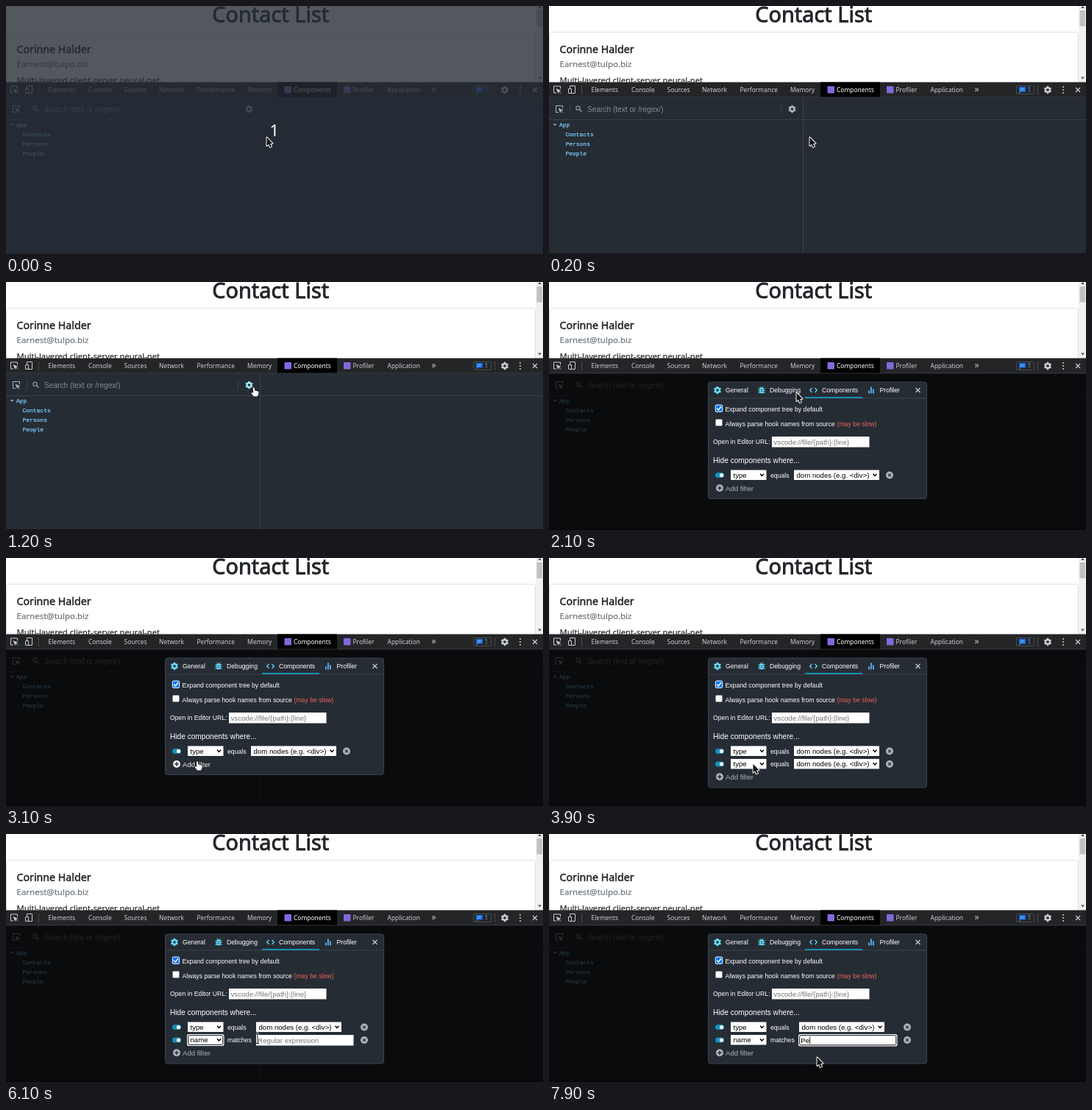
Animation, 730 px wide and 337 px high, one loop 8000 ms. Source, as an HTML page with a canvas:

```html
<!DOCTYPE html>
<html lang="en">
<head>
<meta charset="utf-8">
<title>Component filter demo</title>
<style>
html, body { margin: 0; width: 730px; height: 337px; overflow: hidden; background: #262c34; }
canvas { display: block; width: 730px; height: 337px; }
</style>
</head>
<body>
<canvas id="stage"></canvas>
<script>
const W = 730, H = 337, LOOP = 8000;
const canvas = document.getElementById('stage');
const c = canvas.getContext('2d');
const dpr = window.devicePixelRatio || 1;
canvas.width = W * dpr;
canvas.height = H * dpr;

const UI = '"Noto Sans", "Open Sans", sans-serif';
const ARIAL = '"Liberation Sans", Arial, sans-serif';
const MONO = '"Liberation Mono", "Courier New", monospace';
const PANEL = '#262c34', LINE = '#3d424a', GREY = '#afb3b9', CYAN = '#61dafb';
const SMALL = 8.69, FORM = 9.65, LARGE = 10.14;
const TOP = 103.5;

// time, x, y, pointer shape
const path = [
  [0, 354, 178, 'arrow'], [200, 354, 178, 'arrow'], [400, 345, 159.7, 'arrow'],
  [500, 338.5, 147.5, 'hand'], [600, 338.5, 147.5, 'hand'], [800, 335.8, 143, 'hand'],
  [1300, 335.8, 143, 'arrow'], [2000, 335.8, 143, 'arrow'], [2100, 336, 150, 'arrow'],
  [2900, 262, 275, 'hand'], [3000, 262, 275, 'hand'], [3100, 259, 276, 'hand'],
  [3500, 259, 276, 'arrow'], [3900, 277, 279.5, 'arrow'], [4600, 277, 279.5, 'arrow'],
  [5000, 273, 304, 'arrow'], [5800, 273, 304, 'arrow'], [6100, 342, 278, 'beam'],
  [6400, 349, 278, 'beam'], [6500, 349, 278, 'beam'], [6600, 354, 283, 'beam'],
  [6800, 354, 283, 'beam'], [6900, 364, 303, 'arrow'], [8000, 364, 303, 'arrow']
];

function rect(x, y, w, h, color) {
  c.fillStyle = color;
  c.fillRect(x, y, w, h);
}

function box(x, y, w, h, r, fill, edge) {
  c.beginPath();
  c.roundRect(x, y, w, h, r);
  if (fill) { c.fillStyle = fill; c.fill(); }
  if (edge) { c.strokeStyle = edge; c.lineWidth = 1; c.stroke(); }
}

function text(s, x, y, size, color, family = ARIAL, weight = 400) {
  c.font = `${weight} ${size}px ${family}`;
  c.fillStyle = color;
  c.fillText(s, x, y);
}

// Thickens the stems by a thin outline, for weights between regular and bold.
function heavyText(s, x, y, size, color, family, heft) {
  text(s, x, y, size, color, family);
  c.strokeStyle = color;
  c.lineWidth = heft;
  c.lineJoin = 'round';
  c.strokeText(s, x, y);
}

function stroke(points, color, width = 1, close = false) {
  c.beginPath();
  points.forEach(([x, y]) => c.lineTo(x, y));
  if (close) c.closePath();
  c.strokeStyle = color;
  c.lineWidth = width;
  c.stroke();
}

function shape(points, color) {
  c.beginPath();
  points.forEach(([x, y]) => c.lineTo(x, y));
  c.fillStyle = color;
  c.fill();
}

function disc(x, y, r, color) {
  c.beginPath();
  c.arc(x, y, r, 0, 7);
  c.fillStyle = color;
  c.fill();
}

function cross(x, y, r, color, width = 1) {
  stroke([[x - r, y - r], [x + r, y + r]], color, width);
  stroke([[x + r, y - r], [x - r, y + r]], color, width);
}

function gear(x, y, r, color) {
  c.beginPath();
  c.arc(x, y, r * 0.57, 0, 7);
  c.strokeStyle = color;
  c.lineWidth = r * 0.45;
  c.stroke();
  for (let i = 0; i < 6; i++) {
    const a = i * Math.PI / 3 + Math.PI / 6, dx = Math.cos(a) * r, dy = Math.sin(a) * r;
    stroke([[x + dx * 0.65, y + dy * 0.65], [x + dx, y + dy]], color, r * 0.42);
  }
}

function picker(x, y, color) {
  stroke([[x + 4.5, y - 1], [x + 4.5, y - 4.5], [x - 4.5, y - 4.5], [x - 4.5, y + 4.5], [x - 1, y + 4.5]], color);
  shape([[x - 1.5, y - 1.5], [x + 5.5, y + 1.5], [x + 2.5, y + 2.5], [x + 1.5, y + 5.5]], color);
  stroke([[x + 2, y + 2], [x + 5, y + 5]], color);
}

function page(hover) {
  c.save();
  c.beginPath();
  c.rect(0, 0, W, 104);
  c.clip();
  rect(0, 0, W, 104, '#fff');
  c.textAlign = 'center';
  heavyText('Contact List', 359.7, 22.3, 28.9, '#212529', UI, 0.9);
  c.textAlign = 'left';
  box(0.5, 35.7, 719, 120, 3, null, '#dfdfdf');
  heavyText('Corinne Halder', 14.5, 64, 14.2, '#212529', UI, 0.5);
  heavyText('Earnest@tulpo.biz', 14.5, 83, 11.5, '#6c757d', UI, 0.2);
  heavyText('Multi-layered client-server neural-net', 14.5, 105, 11.2, '#212529', UI, 0.15);
  if (hover) {
    rect(0, 0, 720, 104, 'rgba(120,170,210,.7)');
    box(2, -4, 109, 20, 2, '#546f89');
    text('App', 6.5, 9.3, SMALL, '#98a2cb', MONO, 700);
    rect(30, 1, 1, 11, '#7f93a6');
    text('994px × 1646px', 35, 9.3, SMALL, '#b4c9da', MONO, 700);
  }
  rect(720, 0, 10, 104, '#f1f1f1');
  rect(721.5, 6, 7.5, 21.5, '#c1c1c1');
  shape([[723, 3], [728, 3], [725.5, 0]], '#505050');
  shape([[723, 96.5], [728, 96.5], [725.5, 99.5]], '#505050');
  c.restore();
}

function toolbar() {
  const ink = '#cbced2';
  rect(0, TOP, W, 22, '#242527');
  rect(0, TOP + 20, W, 1, '#3f4245');
  rect(369, TOP, 81, 20, '#000');
  picker(11, 113.5, ink);
  box(28.5, 108.5, 7, 10, 0.5, null, ink);
  box(26.5, 112.5, 4, 6, 0.5, '#242527', ink);
  rect(44, 108, 1, 12, '#494c50');
  const tabs = [['Elements', 57.5], ['Console', 112], ['Sources', 160.5], ['Network', 208],
    ['Performance', 259.5], ['Memory', 328], ['Components', 391], ['Profiler', 471.5], ['Application', 518.5]];
  tabs.forEach(([s, x]) => text(s, x, 116.8, 8.45, s === 'Components' ? '#fff' : ink, UI));
  box(378.5, 109, 9.5, 9.5, 1, '#8468dc');
  box(459, 109, 9.5, 9.5, 1, '#8468dc');
  text('»', 578.5, 117, 12, ink, UI);
  box(635.5, 108.5, 24, 11, 1, null, '#494c50');
  box(639, 110, 9, 6.5, 1, '#1a73e8');
  shape([[639, 115], [639, 119], [642.5, 116]], '#1a73e8');
  rect(641, 112, 5, 0.8, '#8fbcf5');
  rect(641, 114, 4, 0.8, '#8fbcf5');
  text('1', 650.5, 117, 8.4, '#6ba5ef', UI);
  rect(664, 108, 1, 12, '#494c50');
  gear(678, 114, 5.3, ink);
  [110, 114, 118].forEach(y => disc(699, y, 1, ink));
  cross(719, 114, 3, ink, 1.2);
}

function tree(hover, gearColor) {
  rect(0, TOP + 21, W, H, PANEL);
  picker(14, 140, GREY);
  rect(28, 134, 1, 12, LINE);
  c.beginPath();
  c.arc(39.5, 138.7, 2.6, 0, 7);
  c.strokeStyle = '#8f959d';
  c.lineWidth = 1.2;
  c.stroke();
  stroke([[41.4, 140.6], [44.5, 143.7]], '#8f959d', 1.4);
  text('Search (text or /regex/)', 52, 143.5, LARGE, '#858b93');
  rect(315, 134, 1, 12, LINE);
  gear(330.5, 140, 5.2, gearColor);
  rect(0, 154, W, 1, LINE);
  if (hover) rect(0, 154.5, 345, 13.5, LINE);
  rect(345, 125, 1, H - 125, LINE);
  shape([[5.5, 160], [10.5, 160], [8, 163]], '#9aa0a8');
  heavyText('App', 14, 164, 7.96, '#7ccbfa', MONO, 0.25);
  ['Contacts', 'Persons', 'People']
    .forEach((s, i) => heavyText(s, 22.5, 177 + i * 13, 7.96, '#7ccbfa', MONO, 0.25));
  rect(0, 336, W, 1, '#101316');
}

function focusRing(x, y, w, h) {
  box(x - 1, y - 1, w + 2, h + 2, 2.5, '#fff');
  box(x + 0.7, y + 0.7, w - 1.4, h - 1.4, 1.5, '#fff', '#101010');
}

function select(s, x, y, w, focus) {
  if (focus) focusRing(x, y, w, 14);
  else rect(x, y, w, 13.5, '#fff');
  text(s, x + 3.5, y + 10, FORM, '#000');
  const a = x + w - 6;
  stroke([[a - 2.5, y + 5.3], [a, y + 8], [a + 2.5, y + 5.3]], '#000', 1.4);
}

function removeIcon(x, y) {
  disc(x, y, 5, GREY);
  cross(x, y, 1.9, PANEL, 1.2);
}

function toggle(y) {
  box(226, y - 3.5, 12, 7, 3.5, '#178fb9');
  disc(234.6, y, 2.6, '#fff');
}

function filterRow(y, kind, verb, focus) {
  toggle(y);
  select(kind, 247, y - 7, 48.5, focus);
  text(verb, 301, y + 3, SMALL, '#fff');
}

function bug(x, y) {
  box(x - 2.7, y - 3.5, 5.4, 8, 2.7, CYAN);
  [-2, 0.7, 3.3].forEach(d => stroke([[x - 4.6, y + d], [x + 4.6, y + d]], CYAN, 1.1));
  stroke([[x - 2.5, y - 5], [x, y - 3], [x + 2.5, y - 5]], CYAN);
  rect(x - 1.2, y - 1, 2.4, 0.9, PANEL);
  rect(x - 1.2, y + 1.4, 2.4, 0.9, PANEL);
}

function dialog(t) {
  const two = t >= 3500, named = t >= 5700, typing = t >= 6400;
  rect(0, TOP + 21, W, H, 'rgba(0,0,0,.75)');
  box(216.5, 136, 297, two ? 176 : 158.5, 3, PANEL, LINE);
  rect(217, 157.5, 296, 1, LINE);
  rect(348, 156, 78, 2, '#178fb9');
  gear(229, 147, 5.2, CYAN);
  bug(289, 147);
  stroke([[357.5, 144], [354.7, 147], [357.5, 150]], CYAN, 1.2);
  stroke([[361.5, 144], [364.3, 147], [361.5, 150]], CYAN, 1.2);
  [[434, 4], [437, 9], [440, 6]].forEach(([x, h]) => rect(x, 151.5 - h, 1.8, h, '#5bb4f5'));
  [['General', 240], ['Debugging', 300], ['Components', 371], ['Profiler', 449.5]]
    .forEach(([s, x]) => text(s, x, 150.2, SMALL, '#fff'));
  cross(501.5, 147, 3, '#d0d3d7', 1.1);

  box(226.3, 167, 9.4, 9.4, 1.5, '#0075ff', '#fff');
  stroke([[228.2, 171.8], [230.3, 174], [234, 169.2]], '#fff', 1.5);
  text('Expand component tree by default', 239.5, 176, SMALL, '#fff');
  box(226.5, 186.5, 9, 9, 1.5, '#fff', '#8a8a8a');
  text('Always parse hook names from source', 239.5, 195.5, SMALL, '#fff');
  text('(may be slow)', 391.5, 195.5, SMALL, '#f0625a');
  text('Open in Editor URL:', 223, 220.3, SMALL, '#fff');
  rect(303, 210, 132.5, 14.5, '#fff');
  text('vscode://file/{path}:{line}', 305.5, 220.5, FORM, '#757575');
  text('Hide components where...', 223, 245.5, LARGE, '#fff');

  filterRow(262.5, 'type', 'equals', false);
  select('dom nodes (e.g. <div>)', named ? 340 : 333, 255.5, 116, false);
  removeIcon(named ? 487 : 463, 262.5);

  if (two) {
    const focus = t >= 4200 && !typing;
    filterRow(280, named ? 'name' : 'type', named ? 'matches' : 'equals', focus);
    removeIcon(named ? 487 : 463, 280);
    if (!named) select('dom nodes (e.g. <div>)', 333, 273, 116, false);
    else {
      if (typing) focusRing(340, 273, 132.5, 14.5);
      else rect(340, 273, 132.5, 14.5, '#fff');
      if (t >= 7900) {
        text('Pe', 342.3, 283.5, FORM, '#000');
        rect(354.3, 275.5, 0.8, 10, '#000');
      } else {
        text('Regular expression', 342.3, 283.5, FORM, '#757575');
        if (typing && t < 6900) rect(342, 275.5, 0.8, 10, '#000');
      }
    }
  }

  const y = two ? 297.3 : 280;
  const ink = t >= 2900 && !two ? '#ededed' : GREY;
  disc(232, y, 5, ink);
  rect(229.2, y - 0.7, 5.6, 1.4, PANEL);
  rect(231.3, y - 2.8, 1.4, 5.6, PANEL);
  text('Add filter', 240, y + 3.5, FORM, ink);
}

function menu(pointerY) {
  const active = pointerY > 300 ? 1 : 2;
  rect(245, 287, 52, 52, '#fff');
  ['location', 'name', 'type', 'hoc'].forEach((s, i) => {
    const y = 287 + i * 13;
    if (i === active) rect(245, y, 52, 13, '#1e6fd9');
    text(s, 250.5, y + 9.7, FORM, i === active ? '#fff' : '#000');
  });
  c.strokeStyle = '#8a8a8a';
  c.lineWidth = 1;
  c.strokeRect(245.5, 287.5, 51, 52);
}

function pointerAt(t) {
  let i = 0;
  while (i < path.length - 2 && path[i + 1][0] <= t) i++;
  const [t0, x0, y0, kind] = path[i], [t1, x1, y1] = path[i + 1];
  const k = (t - t0) / (t1 - t0);
  return { x: x0 + (x1 - x0) * k, y: y0 + (y1 - y0) * k, kind };
}

function pointer({ x, y, kind }) {
  c.save();
  c.translate(x, y);
  c.lineJoin = 'round';
  if (kind === 'arrow') {
    const p = [[0.5, 0.5], [0.5, 12], [3, 9.8], [5, 14], [7, 13], [5, 9], [8.5, 8.7]];
    stroke(p, '#fff', 1.9, true);
    shape(p, '#111');
  } else if (kind === 'hand') {
    const p = [[0, 1], [1, 0], [2, 1], [2.4, 4.5], [7, 5.5], [7.8, 7], [7.2, 10.5], [6, 12.5],
      [1, 12.5], [-2.2, 8.5], [-2, 7.2], [-0.8, 7], [0.4, 8]];
    stroke(p, '#111', 1.6, true);
    shape(p, '#fff');
  } else {
    const bars = [[[-2, -6.5], [2, -6.5]], [[0, -6.5], [0, 6.5]], [[-2, 6.5], [2, 6.5]]];
    bars.forEach(p => stroke(p, '#fff', 2.4));
    bars.forEach(p => stroke(p, '#111', 1));
  }
  c.restore();
}

function draw(now) {
  const t = Math.floor(now % LOOP / 100) * 100;
  const p = pointerAt(t);
  const hover = t === 400;
  c.setTransform(dpr, 0, 0, dpr, 0, 0);
  page(hover);
  toolbar();
  tree(hover, t >= 1200 ? '#a2e9fc' : t >= 500 ? '#ededed' : GREY);
  if (t < 200) {
    rect(0, 0, W, H, 'rgba(37,44,52,.79)');
    text('1', 358.5, 177, 22, '#fff', UI);
  }
  if (t >= 1300) dialog(t);
  if (t >= 4200 && t < 5700) menu(p.y);
  pointer(p);
  requestAnimationFrame(draw);
}
requestAnimationFrame(draw);
</script>
</body>
</html>
```
